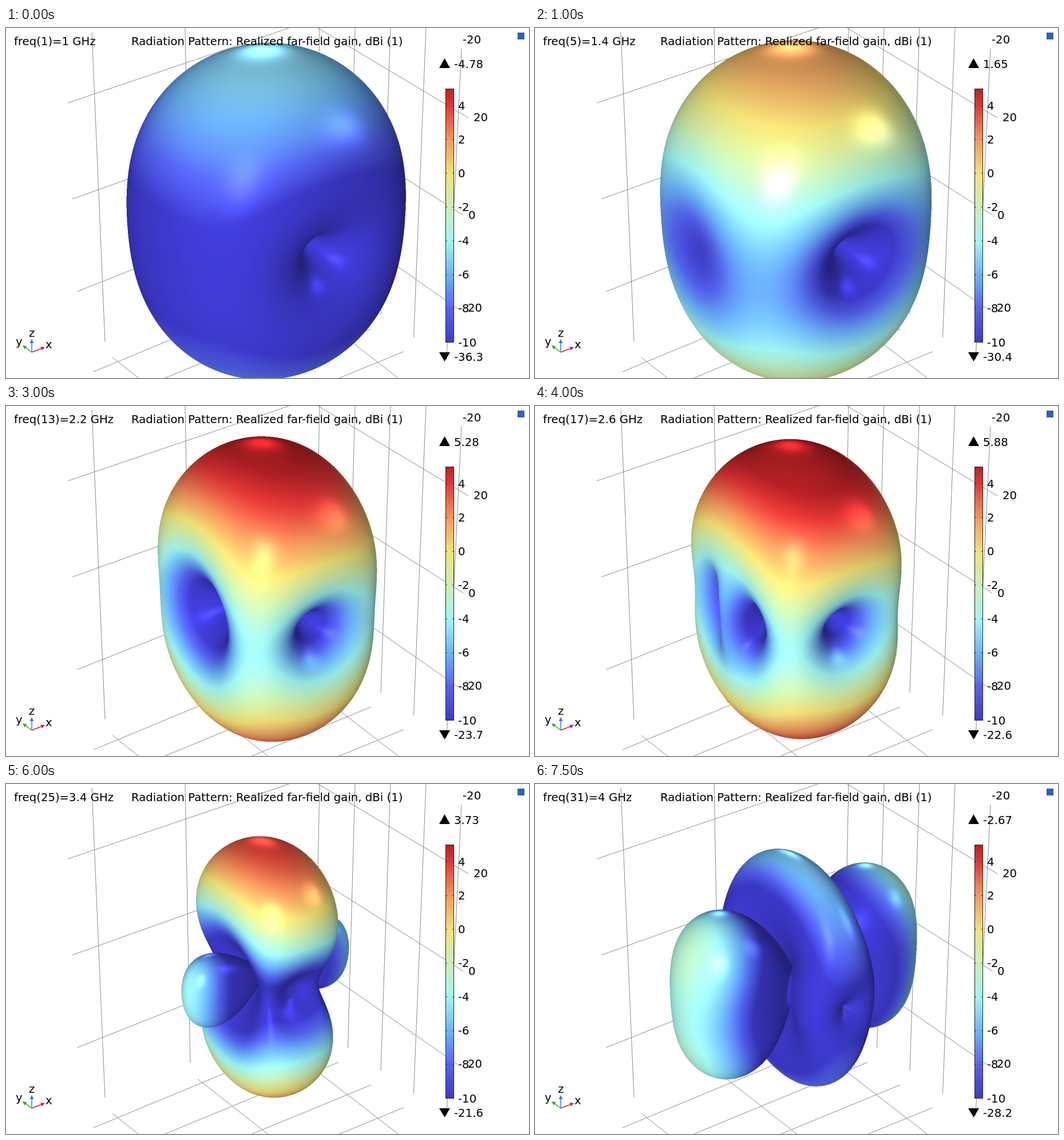
An HTML page with a canvas for the animation above (7.75 s loop, 914 by 612 pixels).

```html
<!DOCTYPE html>
<html>
<head>
<meta charset="utf-8">
<style>
html, body { margin: 0; width: 100%; height: 100%; overflow: hidden; background: #fff; }
canvas { display: block; }
</style>
</head>
<body>
<canvas id="stage" width="914" height="612"></canvas>
<script>
const W = 914, H = 612, SCALE = 2, STEP = 250, COUNT = 31;
const ctx = document.getElementById('stage').getContext('2d');
const layer = document.createElement('canvas');
const w = layer.width = W * SCALE, h = layer.height = H * SCALE;
const layerCtx = layer.getContext('2d');
const image = layerCtx.createImageData(w, h);
const pixels = new Uint32Array(image.data.buffer);
const zbuf = new Float32Array(w * h);

// Gain limits in dB at a few steps, joined by a smooth curve
const KEY_STEPS = [0, 4, 8, 16, 20, 24, 30];
const MAX_GAIN = [-4.78, 1.65, 4.19, 5.88, 5.52, 3.73, -2.67];
const MIN_GAIN = [-36.3, -30.4, -26.3, -22.6, -27.9, -21.6, -28.2];

function curve(values, step) {
  const last = KEY_STEPS.length - 1;
  let i = 0;
  while (i < last - 1 && step > KEY_STEPS[i + 1]) i++;
  const slope = k => {
    const a = Math.max(0, k - 1), b = Math.min(last, k + 1);
    return (values[b] - values[a]) / (KEY_STEPS[b] - KEY_STEPS[a]);
  };
  const span = KEY_STEPS[i + 1] - KEY_STEPS[i], u = (step - KEY_STEPS[i]) / span;
  return values[i] + (values[i + 1] - values[i]) * u * u * (3 - 2 * u)
    + span * u * (1 - u) * (slope(i) * (1 - u) - slope(i + 1) * u);
}

function ease(step, from, to) {
  const u = Math.min(1, Math.max(0, (step - from) / (to - from)));
  return u * u * (3 - 2 * u);
}

function paramsAt(step) {
  const mid = ease(step, 16, 20), side = ease(step, 20, 30), late = ease(step, 24, 30);
  const max = curve(MAX_GAIN, step);
  return {
    max, min: curve(MIN_GAIN, step),
    zenith: max - 2.6 * late,
    split: .3 + step / 15,
    horizon: .32 + .2 * mid - .52 * late,
    sharp: .9 + .4 * mid - .7 * late,
    fill: .7 * ease(step, 8, 16) * (1 - .9 * ease(step, 18, 26)),
    belt: 3.5 * late,
    narrow: 1 - side,
    floor: .4 * side
  };
}

// Gain in dB towards the unit vector (x, y, z)
function gain(P, x, y, z) {
  const xx = x * x, yy = y * y, ss = Math.max(0, 1 - yy), flat = Math.max(0, 1 - z * z);
  const lobes = 1 - P.split * xx * (1 - P.narrow * yy) - P.belt * xx * z * z;
  const field = lobes * (1 - P.horizon * flat ** 1.5);
  const power = ss ** P.sharp * field ** 2 + (P.fill * x * z) ** 2 * ss + (P.floor * yy) ** 2;
  const dB = P.zenith + 10 * Math.log10(power + 1e-9) + .6 * (z - 1);
  return Math.min(P.max, Math.max(P.min + .2, dB));
}

// Colour scale, one stop every 2 dB from -10
const STOPS = [[61, 57, 203], [84, 100, 240], [108, 180, 250], [160, 246, 243], [202, 240, 180],
  [242, 226, 120], [243, 152, 92], [228, 54, 54], [150, 14, 22]];
function scaleColor(dB) {
  const t = (Math.min(5, Math.max(-10, dB)) + 10) / 2, i = Math.floor(t);
  return STOPS[i].map((c, j) => c + (STOPS[i + 1][j] - c) * (t - i));
}

// Camera: x right, y up, z towards the viewer
const AZ = 35 * Math.PI / 180, EL = Math.PI / 6;
const ca = Math.cos(AZ), sa = Math.sin(AZ), ce = Math.cos(EL), se = Math.sin(EL);
const view = (x, y, z) => {
  const away = x * sa + y * ca;
  return [x * ca - y * sa, away * se + z * ce, z * se - away * ce];
};
const CENTER_X = 455, CENTER_Y = 328, DISTANCE = 440, FOCAL = 9.8 * DISTANCE;

const unit = v => { const l = Math.hypot(...v) || 1; return v.map(c => c / l); };
const dot = (a, b) => a[0] * b[0] + a[1] * b[1] + a[2] * b[2];
const sub = (a, b) => [a[0] - b[0], a[1] - b[1], a[2] - b[2]];
const cross = (a, b) => [a[1] * b[2] - a[2] * b[1], a[2] * b[0] - a[0] * b[2], a[0] * b[1] - a[1] * b[0]];
const KEY_LIGHT = unit([-.25, -.18, .95]);
const SHINES = [[unit([-.1, -.06, 1]), .38], [unit([-.03, .92, .38]), .75], [unit([.58, .26, .77]), .36]];

function brightness(n) {
  let sum = .6 + .5 * Math.max(0, dot(n, KEY_LIGHT));
  for (const [dir, amount] of SHINES) sum += amount * Math.max(0, dot(n, dir)) ** 80;
  return sum;
}

const ROWS = 200, COLS = 260;

// Grid of directions with its poles on the y axis, where the sharp nulls are
function buildMesh(P) {
  const points = [], mesh = [];
  for (let i = 0; i <= ROWS; i++) {
    const th = .004 + (Math.PI - .008) * i / ROWS;
    for (let j = 0; j < COLS; j++) {
      const ph = 2 * Math.PI * j / COLS;
      const x = Math.sin(th) * Math.cos(ph), y = Math.cos(th), z = Math.sin(th) * Math.sin(ph);
      const dB = gain(P, x, y, z), r = dB - P.min;
      points.push({ pos: view(x * r, y * r, z * r), dB });
    }
  }
  const at = (i, j) => points[Math.min(ROWS, Math.max(0, i)) * COLS + (j + COLS) % COLS];
  for (let i = 0; i <= ROWS; i++) for (let j = 0; j < COLS; j++) {
    const { pos, dB } = at(i, j);
    let n = unit(cross(sub(at(i + 1, j).pos, at(i - 1, j).pos), sub(at(i, j + 1).pos, at(i, j - 1).pos)));
    if (dot(n, pos) < 0) n = n.map(c => -c);
    const light = brightness(n), zoom = FOCAL / (DISTANCE - pos[2]);
    mesh.push([(CENTER_X + pos[0] * zoom) * SCALE, (CENTER_Y - pos[1] * zoom) * SCALE, pos[2],
      ...scaleColor(dB).map(c => Math.min(255, c * light))]);
  }
  return mesh;
}

function fillTriangle(a, b, c) {
  const area = (b[0] - a[0]) * (c[1] - a[1]) - (b[1] - a[1]) * (c[0] - a[0]);
  if (!area) return;
  const x0 = Math.max(0, Math.ceil(Math.min(a[0], b[0], c[0]))), x1 = Math.min(w - 1, Math.max(a[0], b[0], c[0]));
  const y0 = Math.max(0, Math.ceil(Math.min(a[1], b[1], c[1]))), y1 = Math.min(h - 1, Math.max(a[1], b[1], c[1]));
  for (let y = y0; y <= y1; y++) for (let x = x0; x <= x1; x++) {
    const u = ((x - a[0]) * (c[1] - a[1]) - (y - a[1]) * (c[0] - a[0])) / area;
    const v = ((b[0] - a[0]) * (y - a[1]) - (b[1] - a[1]) * (x - a[0])) / area;
    const t = 1 - u - v;
    if (u < -1e-6 || v < -1e-6 || t < -1e-6) continue;
    const depth = t * a[2] + u * b[2] + v * c[2], k = y * w + x;
    if (depth <= zbuf[k]) continue;
    zbuf[k] = depth;
    const mix = n => t * a[n] + u * b[n] + v * c[n];
    pixels[k] = 0xff000000 | mix(5) << 16 | mix(4) << 8 | mix(3);
  }
}

function drawSurface(P) {
  pixels.fill(0);
  zbuf.fill(-1e9);
  const mesh = buildMesh(P);
  for (let i = 0; i < ROWS; i++) for (let j = 0; j < COLS; j++) {
    const k = i * COLS, next = (j + 1) % COLS;
    const a = mesh[k + j], b = mesh[k + next], c = mesh[k + COLS + j], d = mesh[k + COLS + next];
    fillTriangle(a, b, c);
    fillTriangle(b, d, c);
  }
  layerCtx.putImageData(image, 0, 0);
  ctx.imageSmoothingQuality = 'high';
  ctx.drawImage(layer, 0, 0, W, H);
}

function path(...pts) {
  ctx.beginPath();
  for (let i = 0; i < pts.length; i += 2) ctx.lineTo(pts[i], pts[i + 1]);
}
function line(color, width, ...pts) {
  path(...pts);
  ctx.strokeStyle = color;
  ctx.lineWidth = width;
  ctx.stroke();
}
function shape(color, ...pts) {
  path(...pts);
  ctx.fillStyle = color;
  ctx.fill();
}
function text(str, x, y) {
  ctx.fillStyle = '#000';
  ctx.fillText(str, x, y);
}

function drawGrid() {
  const rule = (...pts) => line('#8c8c8c', 1, ...pts);
  for (let i = 0; i < 2; i++) rule(150 + 163 * i, 7 - 7 * i, 173 + 149 * i, 548 - 60 * i);
  for (let i = 0; i < 5; i++) rule(548 + 62 * i, i < 4 ? 0 : 36, 540 + 57.5 * i, 422 + 39.6 * i);
  for (let i = 0; i < 3; i++) {
    rule(108 + 8 * i, 131 + 171 * i - 3 * i * i, 527 - 3 * i, -11 + 171 * i - 7 * i * i,
      808 - 9 * i, 157 + 173 * i - 3 * i * i);
    rule(186 + 149 * i, 576 - 60 * i, 426 + 149 * i, 766 - 62 * i);
  }
  for (let i = 0; i < 4; i++) rule(153 + 57 * i, 601 + 39 * i, 524 + 57 * i, 447 + 39.6 * i);
}

function drawArrow(color, x, y) {
  const ox = 45, oy = 567, [dx, dy] = unit([x - ox, y - oy]);
  const bx = x - dx * 7, by = y - dy * 7;
  line(color, 1.5, ox, oy, bx, by);
  shape(color, x, y, bx - dy * 3.5, by + dx * 3.5, bx + dy * 3.5, by - dx * 3.5);
}

function drawLegend(P) {
  const bottom = 549.5, perDB = 29.55;
  for (let y = 106; y < 550; y++) {
    ctx.fillStyle = `rgb(${scaleColor((bottom - y) / perDB - 10)})`;
    ctx.fillRect(768, y, 15, 1);
  }
  ctx.strokeStyle = '#222';
  ctx.lineWidth = 1;
  ctx.strokeRect(768.5, 106.5, 14, 443);
  for (let dB = -10; dB <= 4; dB += 2) {
    const y = bottom - (dB + 10) * perDB;
    line('#222', 1, 768, y, 771, y);
    line('#222', 1, 780, y, 783, y);
    text(dB, 790, y + 7);
  }
  shape('#000', 757, 70, 776, 70, 766.5, 53);
  shape('#000', 757, 567, 776, 567, 766.5, 583);
  text(P.max.toPrecision(3), 783, 70);
  text(P.min.toPrecision(3), 783, 582);
}

function draw(step) {
  const P = paramsAt(step);
  ctx.fillStyle = '#fff';
  ctx.fillRect(0, 0, W, H);
  drawGrid();
  drawSurface(P);

  ctx.font = '19.7px "DejaVu Sans", sans-serif';
  text(`freq(${step + 1})=${+(1 + step / 10).toFixed(1)} GHz`, 14, 30);
  text('Radiation Pattern: Realized far-field gain, dBi (1)', 219, 30);
  text('-20', 798, 27);
  text('20', 817, 163);
  text('0', 808, 334);
  text('20', 807, 496);
  drawLegend(P);

  drawArrow('#d81b50', 68, 558);
  drawArrow('#3fa535', 29, 555);
  drawArrow('#3f78c0', 45, 544);
  text('x', 69, 560);
  text('y', 17, 555);
  text('z', 40, 540);
  ctx.fillStyle = '#2c62b8';
  ctx.fillRect(894, 8, 12, 12);
}

let shown = -1;
function tick() {
  const step = Math.floor(performance.now() / STEP) % COUNT;
  if (step !== shown) draw(shown = step);
  requestAnimationFrame(tick);
}
tick();
</script>
</body>
</html>
```
